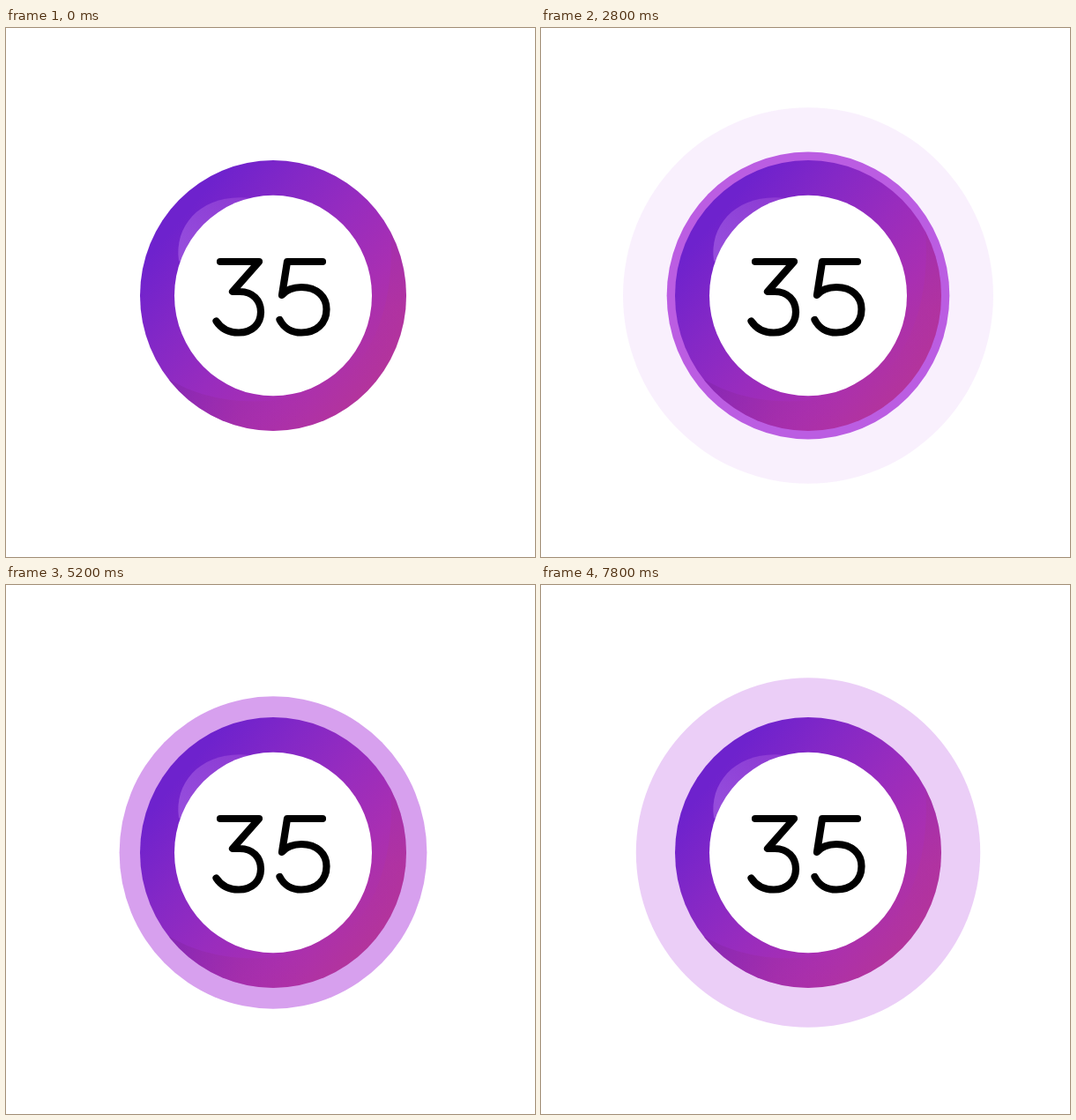
Write an HTML page with a canvas that moves like this. It is 600 px wide and 600 px high and loops after 8 s.

```html
<!DOCTYPE html>
<html lang="en">
<head>
<meta charset="utf-8">
<title>Pulsing counter</title>
<style>
  html, body { margin: 0; width: 100%; height: 100%; overflow: hidden; background: #fff; }
  canvas { display: block; width: 600px; height: 600px; }
</style>
</head>
<body>
<canvas id="stage" width="600" height="600" role="img" aria-label="35">35</canvas>
<script>
const ctx = document.getElementById('stage').getContext('2d');

const LOOP = 8000, STEP = 200, PERIOD = 2025;
const CX = 303, CY = 303.5, RING = 151, HOLE = 112, TALL = 1.016;

// [age in ms, value]
const SPREAD = [[300, 0], [550, 2.5], [780, 9.5], [1180, 24.5], [1735, 44.5], [2170, 52.8], [2800, 59], [3150, 60.5]];
const ALPHA = [[300, 1], [550, .93], [780, .8], [1180, .465], [1735, .245], [2170, .16], [2800, .075], [3150, 0]];

// Smooth curve through the points, flat at both ends.
function curve(points, x) {
  const n = points.length - 1;
  if (x <= points[0][0]) return points[0][1];
  if (x >= points[n][0]) return points[n][1];
  let i = 0;
  while (x > points[i + 1][0]) i++;
  const slope = j => j < 1 || j >= n ? 0
    : (points[j + 1][1] - points[j - 1][1]) / (points[j + 1][0] - points[j - 1][0]);
  const [x0, y0] = points[i], [x1, y1] = points[i + 1];
  const w = x1 - x0, u = (x - x0) / w, v = 1 - u;
  return v * v * (1 + 2 * u) * y0 + u * u * (3 - 2 * u) * y1
    + u * v * v * w * slope(i) - u * u * v * w * slope(i + 1);
}

function oval(r, x = CX, y = CY) {
  const p = new Path2D();
  p.ellipse(x, y, r, r * TALL, 0, 0, 2 * Math.PI);
  return p;
}

function gradient(x0, y0, x1, y1, ...colors) {
  const g = ctx.createLinearGradient(x0, y0, x1, y1);
  colors.forEach((c, i) => g.addColorStop(i / (colors.length - 1), c));
  return g;
}

function fill(path, style) {
  ctx.fillStyle = style;
  ctx.fill(path);
}

const ring = oval(RING), hole = oval(HOLE);
const glint = new Path2D('M196 264C190 222 224 187 277 193L290 240L230 290Z');
const rightShade = new Path2D('M436 228C440 282 432 345 392 390L430 450L480 350L470 220Z');
const lowShade = new Path2D('M186 399C222 421 276 431 338 417L360 470H200L150 410Z');
const digits = new Path2D(
  'M243 265H287L257 299H265C280 299 289 309 289 322C289 336 279 345.5 264 345.5C253 345.5 244 341 238.5 332.5' +
  'M359 265H319L313 303C318 297 326 294 335 294C353 294 363.5 305 363.5 319C363.5 335 352 345.5 335 345.5C324 345.5 315 340 310.5 331');

function drawPulses(t) {
  for (let start = 0; start <= t; start += PERIOD) {
    const age = t - start, spread = curve(SPREAD, age), alpha = curve(ALPHA, age);
    if (spread > 0 && alpha > 0) fill(oval(RING + spread), `rgba(172,58,220,${alpha})`);
  }
}

function drawRing() {
  fill(ring, gradient(195, 220, 415, 405, '#6e22cd', '#8428c6', '#982cbe', '#a92fb2', '#b3349c'));
  ctx.save();
  ctx.clip(ring);
  fill(glint, gradient(200, 245, 270, 190, 'rgba(190,125,240,.45)', 'rgba(190,110,230,.3)'));
  fill(rightShade, gradient(440, 230, 410, 400, 'rgba(160,50,150,.3)', 'rgba(180,52,150,.3)', 'rgba(180,52,150,0)'));
  fill(lowShade, gradient(190, 405, 345, 430, 'rgba(125,35,160,.4)', 'rgba(160,45,150,.3)', 'rgba(170,48,150,0)'));
  ctx.restore();
  fill(hole, '#fff');
}

function drawDigits() {
  ctx.strokeStyle = '#000';
  ctx.lineWidth = 8.2;
  ctx.lineCap = ctx.lineJoin = 'round';
  ctx.stroke(digits);
}

function draw(t) {
  ctx.fillStyle = '#fff';
  ctx.fillRect(0, 0, 600, 600);
  drawPulses(t);
  drawRing();
  drawDigits();
}

const begin = performance.now();
function tick() {
  const t = (performance.now() - begin) % LOOP;
  draw(Math.floor(t / STEP) * STEP);
  requestAnimationFrame(tick);
}
tick();
</script>
</body>
</html>
```
